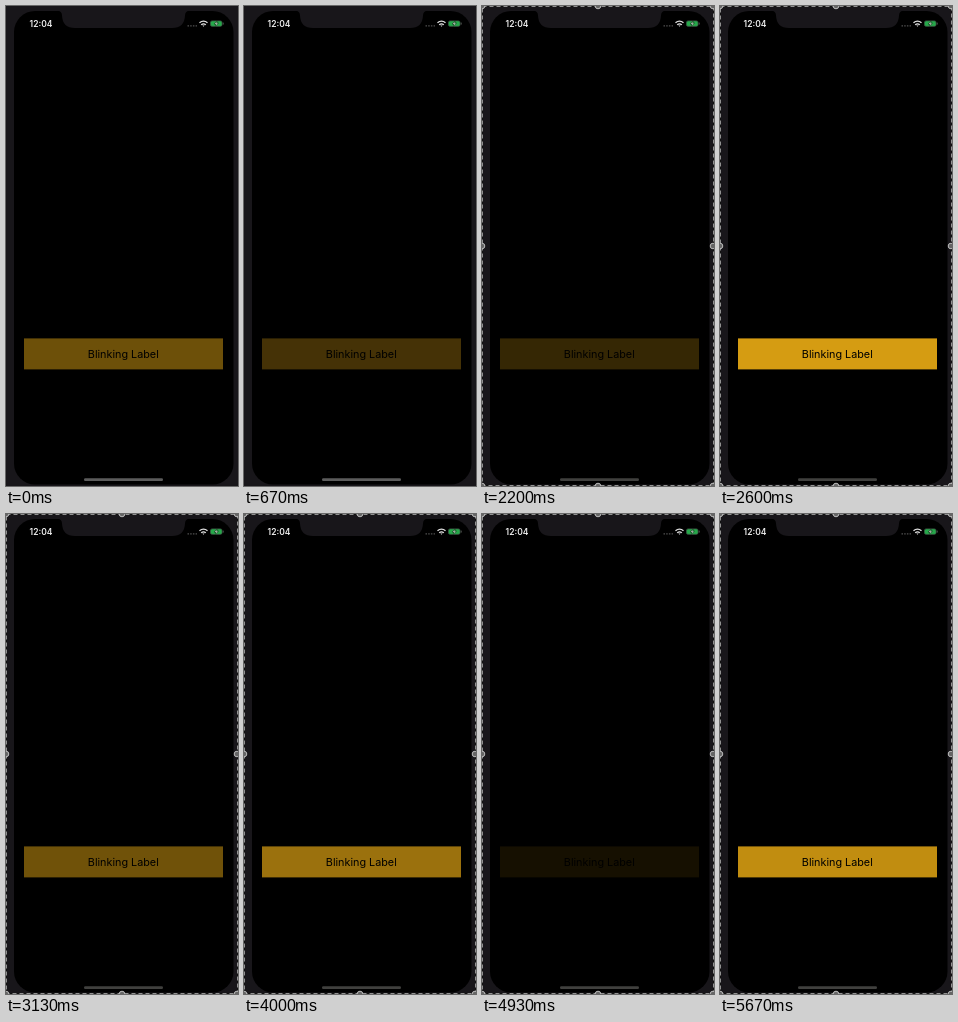
These frames come from a looping animation (232x480 px, 5.74 s). An HTML page:

```html
<!DOCTYPE html>
<html lang="en">
<head>
<meta charset="utf-8">
<title>Blinking Label</title>
<style>
  html, body { margin: 0; width: 232px; height: 480px; overflow: hidden; background: #000; }
  svg { display: block; font-family: Inter, Roboto, sans-serif; }
</style>
</head>
<body>
<svg width="232" height="480" viewBox="0 0 232 480">
  <!-- phone -->
  <rect width="232" height="480" fill="#18161a"/>
  <rect x="8" y="5" width="219.5" height="473.5" rx="21"/>
  <path d="M51 4.5Q56 5 56 9.5Q56.5 22 69 22H166Q178.500 22 179 9.500Q179 5 184 4.500Z" fill="#18161a"/>

  <!-- status bar -->
  <text x="35" y="21" font-size="8.5" font-weight="600" text-anchor="middle" fill="#eee">12:04</text>
  <path d="M181.500 19.800H191" stroke="#505050" stroke-width="1.200" stroke-dasharray="1.500 1.200"/>
  <g fill="none" stroke="#e4e4e4" stroke-width="1.400">
    <path d="M193.500 16.700Q197.500 13.500 201.500 16.700M195.200 18.700Q197.500 17 199.800 18.700"/>
    <path d="M196.400 19.500H198.600L197.500 20.800Z" fill="#e4e4e4" stroke="none"/>
  </g>
  <rect x="204.500" y="14.900" width="11.500" height="5.400" rx="1.600" fill="#25a94a" stroke="#3c5c45" stroke-width=".8"/>
  <path d="M217.200 16.600V18.600" stroke="#555"/>
  <path d="M211.300 14.800L208 18H210L209.300 20.400L212.600 17.200H210.600Z" fill="#dfe8df" stroke="#0a2a12" stroke-width=".6"/>

  <!-- label -->
  <g id="label">
    <rect x="18" y="332.400" width="199" height="31" fill="#e6a814"/>
    <text x="117.300" y="352.200" font-size="10.8" text-anchor="middle">Blinking Label</text>
  </g>
  <rect id="home" x="78" y="472.300" width="79" height="2.700" rx="1.350"/>

  <!-- selection frame -->
  <g id="selection">
    <rect x=".5" y=".5" width="231" height="479" fill="none" stroke="#111"/>
    <rect x=".5" y=".5" width="231" height="479" fill="none" stroke="#929292" stroke-dasharray="4 3"/>
  </g>
</svg>
<script>
const LOOP = 5740, STEP = 200 / 3, SELECT_AT = 2070;
const PERIOD = 1570, DARK_AT = 379;
const [label, home, selection] =
  ['label', 'home', 'selection'].map(id => document.getElementById(id));

for (const x of [0, 116, 231])
  for (const y of [0, 240, 480]) {
    if (x === 116 && y === 240) continue;
    const dot = document.createElementNS('http://www.w3.org/2000/svg', 'circle');
    const attrs = { cx: x, cy: y, r: 2.8, fill: '#666', stroke: '#bbb' };
    for (const key in attrs) dot.setAttribute(key, attrs[key]);
    selection.append(dot);
  }

// The picture advances at 15 steps per second.
function draw(now) {
  const t = now % LOOP;
  const step = Math.min(85, Math.floor((t + 3.4) / STEP));
  const phase = Math.PI * (step * STEP - DARK_AT) / PERIOD;
  const selected = t >= SELECT_AT;
  label.setAttribute('opacity', Math.sin(phase) ** 2);
  home.setAttribute('fill', selected ? '#40403e' : '#5c5c5c');
  selection.setAttribute('visibility', selected ? 'visible' : 'hidden');
}

const start = performance.now();
function tick() {
  draw(performance.now() - start);
  requestAnimationFrame(tick);
}
tick();
</script>
</body>
</html>
```
